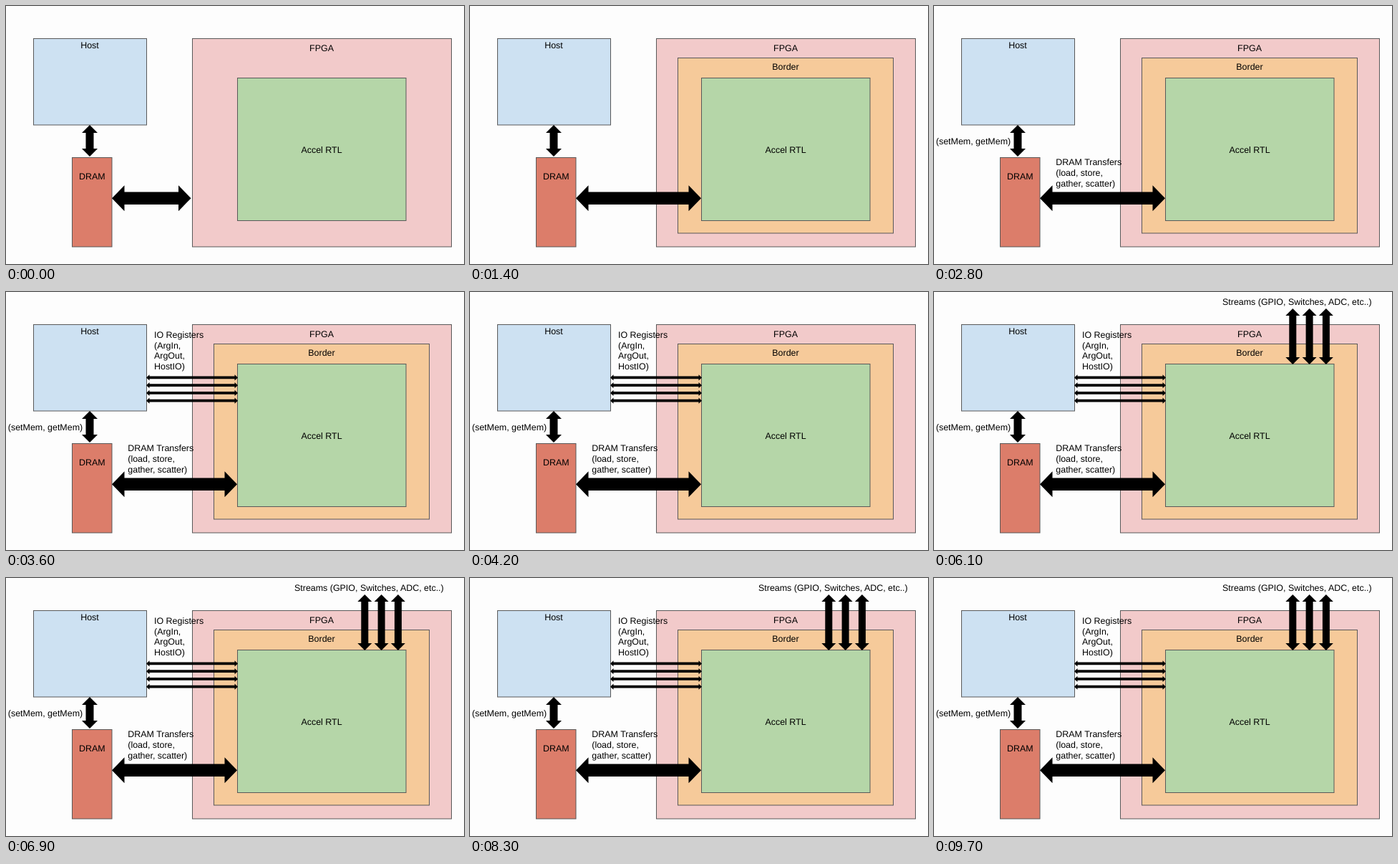
Write an HTML page that moves like this. It is 640 px wide and 360 px high and loops after 9.8 s.

```html
<!DOCTYPE html>
<html lang="en">
<head>
<meta charset="utf-8">
<title>Accelerator overview</title>
<style>
html, body { margin: 0; width: 100%; height: 100%; overflow: hidden; background: #fdfdfd; }
svg { display: block; width: 640px; height: 360px; }
text { font: 12.45px "Liberation Sans", Arial, sans-serif; text-rendering: geometricPrecision; }
rect { stroke: #595959; stroke-width: 1; }
</style>
</head>
<body>
<svg id="stage" viewBox="0 0 640 360"></svg>
<script>
const LOOP = 9800, LINE = 14.8;
// Moments at which each part of the diagram appears, in ms
const SHELL = 1200, MEMORY = 2500, REGISTERS = 3500, STREAMS = 5900;

const box = (x1, y1, x2, y2, fill) =>
  `<rect x="${x1}" y="${y1}" width="${x2 - x1}" height="${y2 - y1}" fill="${fill}"/>`;

const label = (x, y, lines, anchor = "start") =>
  [].concat(lines).map((line, i) =>
    `<text x="${x}" y="${y + i * LINE}" text-anchor="${anchor}">${line}</text>`).join("");

// Double-headed arrow of the given length, starting at (x, y)
function arrow(x, y, length, head, half, shaft, turn = 0) {
  const tail = length - head;
  return `<path transform="translate(${x} ${y}) rotate(${turn})" d="M0 0L${head} ${-half}V${-shaft}H${tail}V${-half}L${length} 0L${tail} ${half}V${shaft}H${head}V${half}Z"/>`;
}

const part = (from, to, content) => `<g data-from="${from}" data-to="${to}">${content}</g>`;

const stage = document.getElementById("stage");
stage.innerHTML =
  box(38.5, 45.5, 196.5, 166, "#cde1f2") +
  box(260.5, 45.5, 622.5, 336, "#f2caca") +
  part(SHELL, LOOP,
    box(290.5, 72.5, 591.5, 317, "#f6ca9a") +
    label(441, 89.4, "Border", "middle")) +
  box(323.5, 100.5, 559, 299.5, "#b5d6a8") +
  box(92.5, 211.5, 148, 336, "#dc7d6a") +
  label(117, 59.4, "Host", "middle") +
  label(441, 63.4, "FPGA", "middle") +
  label(441, 204.8, "Accel RTL", "middle") +
  label(120.3, 242, "DRAM", "middle") +
  arrow(117, 166, 44, 11, 11, 5.5, 90) +
  part(0, SHELL, arrow(148, 268.3, 110.5, 17.5, 18, 8.7)) +
  part(SHELL, LOOP, arrow(148, 268.3, 175, 17.5, 18, 8.7)) +
  part(MEMORY, LOOP,
    label(2.8, 192.5, "(setMem, getMem)") +
    label(170.3, 222.4, ["DRAM Transfers", "(load, store,", "gather, scatter)"])) +
  part(REGISTERS, LOOP,
    label(207, 63.7, ["IO Registers", "(ArgIn,", "ArgOut,", "HostIO)"]) +
    [0, 1, 2, 3].map(i => arrow(196, 119.4 + i * 10.75, 128, 4.5, 4.2, 1.8)).join("")) +
  part(STREAMS, LOOP,
    label(403, 18.2, "Streams (GPIO, Switches, ADC, etc..)") +
    [0, 1, 2].map(i => arrow(501.3 + i * 23.3, 23, 78, 10, 10, 5, 90)).join(""));

const parts = [...stage.querySelectorAll("g")];

function draw(now) {
  const t = now % LOOP;
  for (const g of parts) {
    const shown = t >= +g.dataset.from && t < +g.dataset.to;
    g.style.display = shown ? "" : "none";
  }
  requestAnimationFrame(() => draw(performance.now()));
}
draw(performance.now());
</script>
</body>
</html>
```
